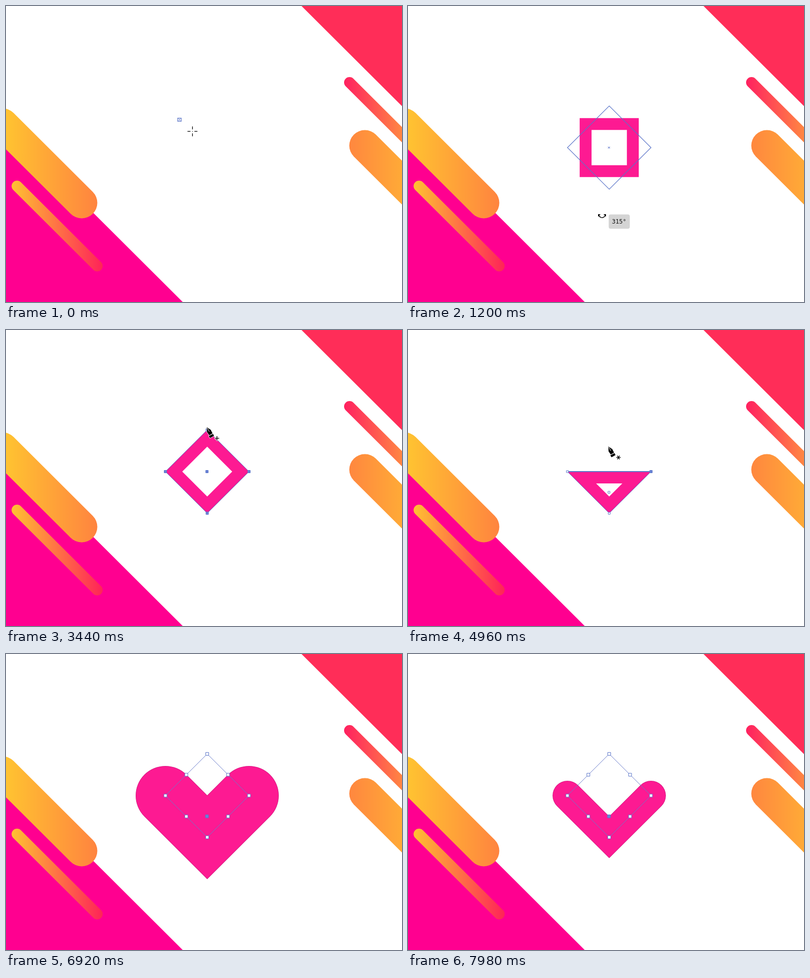
Animation, 800 px wide and 600 px high, one loop 8000 ms. Source, as an HTML page with a canvas:

```html
<!DOCTYPE html>
<html lang="en">
<head>
<meta charset="utf-8">
<title>Heart from a square</title>
<style>
html, body { margin: 0; width: 100%; height: 100%; overflow: hidden; background: #fff; }
canvas { display: block; }
</style>
</head>
<body>
<canvas id="stage" width="800" height="600"></canvas>
<script>
const g = document.getElementById('stage').getContext('2d');
const PINK = '#fd1a92', BLUE = '#5a74c8', LOOP = 8000;
const CX = 406.5, CY = 287, HALF = 59.7, REACH = HALF * Math.SQRT2;
const TOP = [CX, CY - REACH], RIGHT = [CX + REACH, CY];
const BOTTOM = [CX, CY + REACH], LEFT = [CX - REACH, CY];
const CORNERS = [TOP, RIGHT, BOTTOM, LEFT];
const V_MID = [CX - 0.5, 329];

// time since the heart starts growing, half the stroke width
const GROWTH = [[0, 12], [60, 30], [140, 42], [260, 50], [860, 60.1], [1620, 70], [1920, 73.2]];

const phase = (t, from, to) => Math.min(1, Math.max(0, (t - from) / (to - from)));
const easeOut = p => 1 - (1 - p) ** 2;
const mix = (a, b, p) => a + (b - a) * p;
const middle = (a, b) => [(a[0] + b[0]) / 2, (a[1] + b[1]) / 2];

function along(points, x) {
  const i = Math.max(1, points.findIndex(p => p[0] >= x));
  const [a, b] = [points[i - 1], points[i]];
  return mix(a[1], b[1], phase(x, a[0], b[0]));
}

function trace(points, closed = true) {
  g.beginPath();
  points.forEach(p => g.lineTo(...p));
  if (closed) g.closePath();
}

function fill(points, color) {
  trace(points);
  g.fillStyle = color;
  g.fill();
}

function line(points, color, width = 1, closed = false) {
  trace(points, closed);
  g.strokeStyle = color;
  g.lineWidth = width;
  g.stroke();
}

function insideStroke(points) {
  g.save();
  trace(points);
  g.clip();
  line(points, PINK, 48, true);
  g.restore();
}

function handle([x, y], size = 5, solid = true) {
  g.fillStyle = solid ? '#6a83d6' : '#fff';
  g.strokeStyle = BLUE;
  g.lineWidth = 1;
  g.beginPath();
  g.rect(x - size / 2, y - size / 2, size, size);
  g.fill();
  g.stroke();
}

function cross(x, y, r) {
  line([[x - r, y - r], [x + r, y + r]], BLUE);
  line([[x - r, y + r], [x + r, y - r]], BLUE);
}

function capsule(x, y, r, length, from, to) {
  const shade = g.createLinearGradient(x - r, 0, x + length + r, 0);
  shade.addColorStop(0, from);
  shade.addColorStop(1, to);
  g.lineCap = 'round';
  line([[x, y], [x + length, y + length]], shade, 2 * r);
  g.lineCap = 'butt';
}

function background() {
  g.fillStyle = '#fff';
  g.fillRect(0, 0, 800, 600);
  fill([[597, 0], [800, 0], [800, 203]], '#ff2d58');
  fill([[0, 243], [357, 600], [0, 600]], '#ff0090');
  capsule(-7, 239, 31.5, 160, '#ffd02e', '#ff843f');
  capsule(22.3, 365, 11, 162, '#ffc132', '#ff2358');
  capsule(694, 155, 11, 162, '#ff2060', '#ffc132');
  capsule(725, 283, 31.5, 160, '#ff873f', '#ffd02e');
}

function crosshair(x, y) {
  for (const s of [-1, 1]) {
    line([[x + 4 * s, y], [x + 10 * s, y]], '#000', 1.3);
    line([[x, y + 4 * s], [x, y + 10 * s]], '#000', 1.3);
  }
  g.fillStyle = '#000';
  g.fillRect(x - 0.6, y - 0.6, 1.2, 1.2);
}

function turnCursor(x, y, label) {
  g.beginPath();
  g.arc(x, y - 3, 7, 0.3, Math.PI - 0.3);
  g.strokeStyle = '#000';
  g.lineWidth = 1.5;
  g.stroke();
  for (const s of [-1, 1])
    fill([[x + 8 * s, y - 3], [x + 3 * s, y - 3], [x + 8 * s, y + 2]], '#000');
  g.fillStyle = '#d4d4d4';
  g.beginPath();
  g.roundRect(x + 13.5, y - 2.5, 42.5, 29, 4);
  g.fill();
  g.fillStyle = '#111';
  g.font = '12px "DejaVu Sans Mono", monospace';
  g.fillText(label, x + 20, y + 16);
}

function pen(x, y, mark) {
  g.save();
  g.translate(x, y);
  const nib = [[0, 0], [8, 5.5], [11.5, 12.5], [5, 16.5], [0.5, 10]];
  const base = [[4, 18], [12.5, 13.5], [14.5, 17.5], [6.5, 22]];
  for (const part of [nib, base]) {
    line(part, '#fff', 1.5, true);
    fill(part, '#000');
  }
  line([[1, 1.5], [5, 9]], '#fff', 1);
  g.translate(20.5, 22.5);
  const arms = mark === '+' ? 2 : 3;
  for (const [color, width, r] of [['#fff', 3.5, 5.2], ['#000', 1.4, 4.4]])
    for (let i = 0; i < arms; i++) {
      const a = i * Math.PI / arms, c = Math.cos(a) * r, s = Math.sin(a) * r;
      line([[-c, -s], [c, s]], color, width);
    }
  g.restore();
}

function drawSquare(t) {
  const p = easeOut(phase(t, 0, 800));
  const x = CX - HALF, y = CY - HALF;
  const w = mix(7, 2 * HALF, p), h = mix(6, 2 * HALF, p);
  const box = [[x, y], [x + w, y], [x + w, y + h], [x, y + h]];
  if (t >= 800) insideStroke(box);
  line(box, BLUE, 1.2, true);
  cross(x + w / 2, y + h / 2, 2);
  crosshair(mix(376.3, 508, p), mix(253.8, 394, p));
}

function turnSquare(t) {
  const p = easeOut(phase(t, 820, 1200)), turn = p * Math.PI / 4;
  const spin = a => CORNERS.map((_, i) => {
    const b = a + (i + 0.5) * Math.PI / 2;
    return [CX + REACH * Math.cos(b), CY + REACH * Math.sin(b)];
  });
  insideStroke(spin(0));
  line(spin(turn), BLUE, 1.2, true);
  cross(CX - 0.5, CY, 2);
  const a = mix(57, 96, p) * Math.PI / 180;
  turnCursor(CX + 138.7 * Math.cos(a), CY + 138.7 * Math.sin(a),
    Math.round(360 - 45 * p) + '°');
}

function diamond(t) {
  insideStroke(CORNERS);
  line(CORNERS, BLUE, 1, true);
  if (t >= 2220) CORNERS.forEach(c => handle(c, t < 2720 ? 7 : 5, t >= 2720));
  handle([CX - 0.5, CY]);
  if (t >= 3220) {
    const p = easeOut(phase(t, 3200, 3440));
    pen(mix(412, 405.7, p), mix(158, 197, p), '+');
  }
}

function triangle(t) {
  const shape = [LEFT, RIGHT, BOTTOM];
  insideStroke(shape);
  line(shape, BLUE, 1, true);
  line([LEFT, RIGHT], BLUE, 2);
  handle(LEFT, 4, false);
  handle(BOTTOM, 4, false);
  handle(V_MID, 4, false);
  handle(RIGHT);
  const y = t < 4960 ? 203 : mix(235, 282, easeOut(phase(t, 4960, 5060)));
  pen(404.7, y, '*');
}

function openPath() {
  const v = [LEFT, BOTTOM, RIGHT];
  line(v, PINK, 24);
  line(v, BLUE);
  v.forEach(p => handle(p, 4, false));
  handle(V_MID);
}

function heart(t) {
  const v = [LEFT, BOTTOM, RIGHT], r = along(GROWTH, t - 6060);
  g.lineCap = 'round';
  line(v, '#cf167c', 2 * r);
  line(v, PINK, 2 * r - 1.6);
  g.lineCap = 'butt';
  line(CORNERS, '#6a7cca', 1, true);
  CORNERS.forEach((c, i) => {
    handle(c, 6, false);
    handle(middle(c, CORNERS[(i + 1) % 4]), 6, false);
  });
  handle(V_MID, 6);
}

const SCENES = [[840, drawSquare], [2200, turnSquare], [4440, diamond],
  [5560, triangle], [6060, openPath], [LOOP, heart]];

function frame() {
  const t = performance.now() % LOOP;
  background();
  SCENES.find(([end]) => t < end)[1](t);
  requestAnimationFrame(frame);
}
frame();
</script>
</body>
</html>
```
